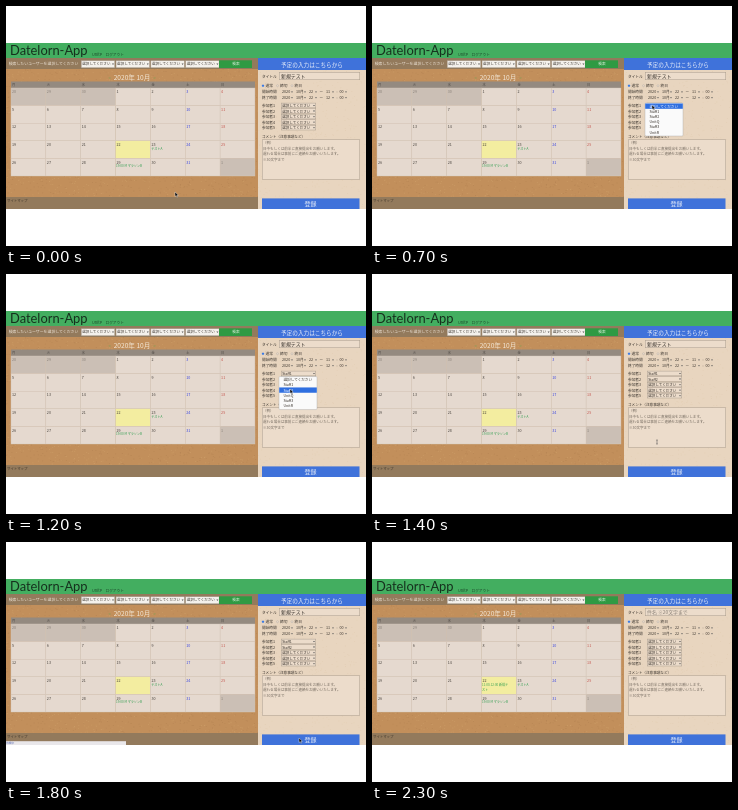
Write an HTML page that moves like this. It is 360 px wide and 240 px high and loops after 2400 ms.

```html
<!DOCTYPE html>
<html lang="ja">
<head>
<meta charset="utf-8">
<style>
html, body { margin: 0; width: 100%; height: 100%; overflow: hidden; background: #fff; }
svg { display: block; width: 360px; height: 240px; }
text { font-family: "Noto Sans CJK JP", "Noto Sans CJK", sans-serif; white-space: pre; }
.title { font-family: Lato, sans-serif; }
</style>
</head>
<body>
<svg id="stage" viewBox="0 0 360 240"></svg>
<script>
const LOOP = 2400, STEP = 100;
const stage = document.getElementById('stage');
const PICK = '選択してください', INK = '#3a342e', LEAF = '#2f9e4f', FIELD = '#ecdccb';

function add(tag, attrs, parent = stage) {
  const el = document.createElementNS('http://www.w3.org/2000/svg', tag);
  for (const k in attrs) el.setAttribute(k, attrs[k]);
  return parent.appendChild(el);
}
const group = () => add('g', {});
const rect = (x, y, width, height, fill, more = {}, parent) =>
  add('rect', { x, y, width, height, fill, ...more }, parent);
function text(str, x, y, size, fill = INK, more = {}, parent) {
  const el = add('text', { x, y, 'font-size': size, fill, ...more }, parent);
  el.textContent = str;
  return el;
}
const box = (x, y, w, h, fill = FIELD) =>
  rect(x + .25, y + .25, w - .5, h - .5, fill, { stroke: '#a99c8d', 'stroke-width': .5 });
const arrow = (x, y) => add('path', { d: `M${x} ${y}h2l-1 1.3z`, fill: '#555' });
const mid = { 'text-anchor': 'middle' }, bold = { 'font-weight': 500 };

// Board and its grain
let seed = 7;
const rnd = () => (seed = seed * 16807 % 2147483647) / 2147483647;
function grain(x, y, w, h, n, fill, opacity) {
  let d = '';
  while (n--) d += `M${(x + rnd() * w).toFixed(1)} ${(y + rnd() * h).toFixed(1)}h1v.8h-1z`;
  add('path', { d, fill, opacity });
}
rect(0, 52, 252, 151, '#c28f5b');
grain(0, 63, 251, 128, 1100, '#8d6237', .18);
grain(0, 63, 251, 128, 900, '#e5bd85', .22);
rect(0, 52, 252, 11, '#937a5c');
rect(0, 191, 252, 12, '#937a5c');
text('サイトマップ', 1, 196, 3.4, '#40372c');

// Top bar
rect(0, 37, 360, 15, '#43ae60');
text('Datelorn-App', 4, 49.4, 12.9, '#16301d', { class: 'title' });
text('UnitP', 86, 50, 3.9, '#1d4a2b');
text('ログアウト', 99.5, 50, 3.7, '#1d4a2b');

// Search row
text('検索したいユーザーを選択してください', 2.7, 59.4, 3.9, '#efe6da');
for (let i = 0; i < 4; i++) {
  const x = 75 + i * 34.8;
  box(x, 54.5, 34, 7.5, '#f4f1ec');
  text(PICK, x + 1.3, 59.4, 3.55, INK, bold);
  arrow(x + 31, 57.6);
}
rect(213, 54.3, 33, 7.7, '#2f9a43');
text('検索', 230, 59.4, 3.7, '#e4f3e4', mid);

// Calendar
const colX = i => 5 + i * 34.85, rowY = i => 82 + i * 17.6;
text('2020年 10月', 126, 73.9, 6.6, '#f3e8d8', { ...mid, ...bold });
text('<', 102.5, 73.4, 4, '#6fa653');
text('>', 147.5, 73.4, 4, '#6fa653');
rect(5, 75.5, 244, 6.5, '#948a80');
for (let i = 0; i < 7; i++) text('月火水木金土日'[i], colX(i) + 1, 80, 3.2, '#4b4641');
for (let i = 0; i < 35; i++) {
  const c = i % 7, x = colX(c), y = rowY(Math.floor(i / 7));
  const other = i < 3 || i > 33, today = i === 24;
  rect(x, y, 34.85, 17.6, today ? '#f3eda0' : other ? '#cbbfb5' : '#e5d9cf',
    { stroke: '#d3c6bb', 'stroke-width': .4 });
  const day = i < 3 ? 28 + i : (i - 3) % 31 + 1;
  const ink = other ? '#8a8179' : ['#3a45e0', '#c4564e'][c - 5] || '#46413c';
  text(day, x + 1, y + 5.2, 3.7, ink);
}
text('テストA', 145.2, 143.6, 3.1, LEAF);
text('19:00 M マラソンB', 110, 161.2, 3.1, LEAF);
const newEvent = group();
text('11:00-12:00 新規テ', 110, 143.8, 3.05, LEAF, {}, newEvent);
text('スト', 110, 148.6, 3.05, LEAF, {}, newEvent);

// Form
rect(252, 52, 108, 151, '#e8d5bf');
grain(252, 64, 107, 138, 500, '#c9ac82', .15);
rect(252, 52, 108, 12, '#3f72da');
text('予定の入力はこちらから', 306, 60.5, 5.65, '#e9effb', { ...mid, ...bold });
text('タイトル', 256, 71.6, 3.7);
box(273, 66, 81, 8);
const subject = text('', 275, 71.8, 4.9, INK, bold);

['通常', '締切', '終日'].forEach((label, i) => {
  const x = 257 + i * 14.5;
  add('circle', { cx: x, cy: 79.7, r: 1, fill: i ? FIELD : '#2f74e8', stroke: i ? '#999' : '#2f74e8', 'stroke-width': .3 });
  text(label, x + 2.5, 81.1, 3.7);
});

[['開始時間', 11], ['終了時間', 12]].forEach(([label, hour], i) => {
  const y = 87.4 + i * 5.8;
  text(label, 256, y, 3.7, INK, bold);
  [['2020', 276, 285], ['10月', 290, 298], ['22', 303, 309], [hour, 320, 326], ['00', 333.5, 339]]
    .forEach(([s, x, ax]) => {
      text(s, x, y, 3.7);
      arrow(ax, y - 2);
    });
  text('ー', 313.5, y, 3.5);
  text(':', 330.5, y, 3.7);
});

const guests = [1, 2, 3, 4, 5].map(n => {
  const y = 95.5 + n * 5.55;
  text('参加者' + n, 256, y, 3.7, INK, bold);
  box(275, y - 4.2, 35, 5.2);
  arrow(307, y - 2);
  return text(PICK, 276.2, y, 3.55, INK, bold);
});

text('コメント（注意事項など）', 256, 131.8, 3.6, INK, bold);
box(256, 133.5, 98, 40);
['（例）', '日中もしくは前半に直接提出をお願いします。', '遅れる場合は事前にご連絡をお願いいたします。', '※30文字まで']
  .forEach((s, i) => text(s, 257, 137.8 + i * 5.7, 3.55, '#746a5f'));
rect(256, 192.4, 97.5, 10.6, '#3f72da');
text('登録', 304.5, 200, 6, '#e4ebf8', mid);

// Open list, status bar, pointers
const list = group();
rect(273, 97, 38, 33, '#fafafa', { rx: 1, stroke: '#aaa', 'stroke-width': .4 }, list);
const mark = rect(273.2, 97.5, 37.6, 5.3, '#2f6fe0', {}, list);
const options = [PICK, 'Staff1', 'Staff2', 'UnitQ', 'Staff3', 'UnitR'].map((s, i) =>
  text(s, 277.5, 101.6 + i * 5.2, 3.6, INK, {}, list));

const status = group();
rect(0, 199.2, 120, 3.8, '#e9e7ea', {}, status);
text('待機中', 0, 202.3, 2.8, '#6a78b8', {}, status);

const pointer = add('path', { d: 'M0 0v4.6l1.1-1 .8 1.8 .8-.4-.8-1.7h1.5z', fill: '#111', stroke: '#fff', 'stroke-width': .35 });
const beam = add('path', { d: 'M-.8 0h1.6M0 0v4M-.8 4h1.6', stroke: '#444', 'stroke-width': .5 });
const route = [[0, 169, 186], [300, 324, 84], [500, 324, 84], [600, 280, 99], [700, 280, 99], [800, 283, 105],
  [900, 292, 105], [1000, 292, 105], [1100, 290, 106], [1200, 284, 115], [1300, 284, 115], [1400, 285, 166],
  [1600, 293, 196], [LOOP, 293, 196]];

function place(t) {
  const i = route.findIndex(p => p[0] > t);
  const [a, x, y] = route[i - 1], [b, u, v] = route[i];
  const k = (t - a) / (b - a), e = k * k * (3 - 2 * k);
  return [x + (u - x) * e, y + (v - y) * e];
}
const show = (el, on) => el.setAttribute('display', on ? 'inline' : 'none');

function draw(now) {
  const t = Math.floor(now % LOOP / STEP) * STEP;
  const saved = t >= 1900, second = t >= 1100;
  subject.textContent = saved ? '件名 ※20文字まで' : '新規テスト';
  subject.setAttribute('fill', saved ? '#8b8279' : INK);
  subject.setAttribute('font-weight', saved ? 400 : 500);
  guests[0].textContent = t >= 900 && !saved ? 'Staff1' : PICK;
  guests[1].textContent = t >= 1300 && !saved ? 'Staff2' : PICK;
  show(newEvent, saved);

  show(list, t >= 600 && t < 900 || second && t < 1300);
  list.setAttribute('transform', `translate(0 ${second ? 5.55 : 0})`);
  const row = second ? (t >= 1200 ? 2 : 0) : (t >= 800 ? 1 : 0);
  mark.setAttribute('y', 97.5 + row * 5.2);
  options.forEach((o, i) => o.setAttribute('fill', i === row ? '#fff' : INK));

  show(status, t >= 1700 && !saved);
  const [x, y] = place(t);
  const typing = x > 256 && y > 133 && y < 174;
  show(beam, typing);
  show(pointer, !typing && !saved);
  for (const el of [beam, pointer]) el.setAttribute('transform', `translate(${x} ${y})`);
}

const start = performance.now();
function tick() {
  draw(performance.now() - start);
  requestAnimationFrame(tick);
}
tick();
</script>
</body>
</html>
```
